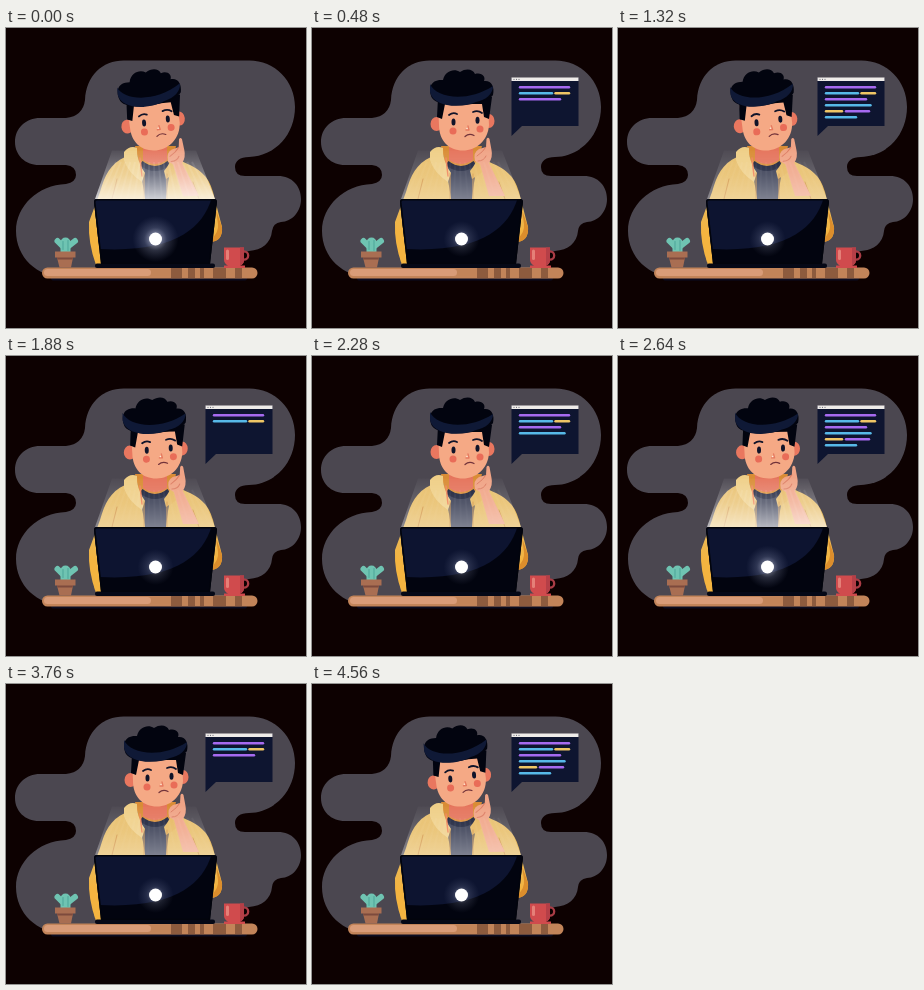
An HTML page that plays this animation: 300 by 300 pixels, repeating every 4.8 s.

```html
<!DOCTYPE html>
<html lang="en">
<head>
<meta charset="utf-8">
<title>Thinking at the laptop</title>
<style>
  html, body { margin: 0; width: 100%; height: 100%; overflow: hidden; background: #0d0101; }
  svg { display: block; width: 100vw; height: 100vh; }
  .line { fill: none; stroke-linecap: round; stroke-linejoin: round; }
</style>
</head>
<body>
<svg viewBox="0 0 300 300">
  <defs>
    <linearGradient id="beamFill" x1="0" y1="0" x2="0" y2="1">
      <stop offset="0" stop-color="#fff" stop-opacity=".06"/>
      <stop offset=".5" stop-color="#fff" stop-opacity=".4"/>
      <stop offset="1" stop-color="#fff" stop-opacity=".95"/>
    </linearGradient>
    <radialGradient id="glowFill">
      <stop offset=".2" stop-color="#e4e8ff" stop-opacity=".55"/>
      <stop offset=".5" stop-color="#a8b0d0" stop-opacity=".25"/>
      <stop offset="1" stop-color="#8088b0" stop-opacity="0"/>
    </radialGradient>
    <linearGradient id="jacket" x1="0" y1="0" x2="0" y2="1">
      <stop offset="0" stop-color="#e8bf6c"/>
      <stop offset=".4" stop-color="#e6b95c"/>
      <stop offset=".7" stop-color="#f4b440"/>
    </linearGradient>
    <clipPath id="lidClip"><path id="lid" d="M91 171H208Q211 171 211 174L204 236H95L88 174Q88 171 91 171Z"/></clipPath>
  </defs>

  <path fill="#4b4750" d="M118 32.500H243C269 32.500 289 53 289 79C289 106 270 128 243 129C234 129 229 133 229 139
    Q229 148 239 148H272C286 148 295 158 295 171C295 184 286 193.500 275 194Q267 195 266 203C265 215 256 222 243 223
    Q234 224 234 232V249H60C32 250 10 230 10 203C10 178 32 157 60 156Q70 154 70 147Q70 138 60 137H33
    C19 137 9 127 9 114C9 100 20 90 34 90H60Q77 88 79 72C80 48 96 32.500 118 32.500Z"/>

  <!-- desk and objects -->
  <rect x="45" y="247" width="196" height="5.500" rx="2" fill="#0b0d22"/>
  <g transform="translate(0 .5)">
    <rect x="36" y="239" width="215.500" height="11" rx="5.500" fill="#c28459"/>
    <rect x="38" y="240.500" width="107" height="7" rx="3.500" fill="#d99c78"/>
    <path fill="#8d5b3e" d="M165 239.500h11v10h-11zM182 239.500h7v10h-7zM194 239.500h4v10h-4zM207 239.500h13v10h-13zM229 239.500h7v10h-7z"/>
    <g class="line" stroke="#6fc4b2" stroke-width="6">
      <path d="M59.500 224V214" stroke-width="10"/>
      <path d="M51.500 212.500L57 218M69 212.500L62 218"/>
    </g>
    <path class="line" stroke="#4ca598" d="M57 213v8M62 212v10"/>
    <path fill="#a96e52" d="M49 223H69.500V229H67L65 239H53.500L51 229H49Z"/>
    <path fill="#7d4a3d" d="M51 229H67L66.500 231H51.500Z"/>
    <circle cx="238" cy="227" r="4.200" fill="none" stroke="#a93c45" stroke-width="2.300"/>
    <path fill="#d04b4d" d="M218 219H238V231Q238 236 234 237H239V239.500H218V237H222Q218 235 218 231Z"/>
    <path fill="#b53f47" d="M234 219H238V231Q238 236 234 237Z"/>
    <path class="line" stroke="#e58078" stroke-width="3" d="M221.500 222.500V230"/>
  </g>

  <!-- torso -->
  <path fill="url(#jacket)" d="M119 129C104 136 99 147 94 164L83 194Q82 215 90 237H204V214Q217 213 216 199
    L207 164C202 147 194 141 175 133Z"/>
  <path fill="#dc8e2c" d="M210 182L212 196Q213 205 205 211V214Q217 213 216 199Z"/>
  <path fill="#343950" d="M133 131L139 171H160L165 131Z"/>
  <path fill="#d98c35" d="M129 118H170L166 136Q149 148 133 136Z"/>
  <path fill="#e5745c" d="M137 114H161V132Q149 140 137 132Z"/>
  <path fill="none" stroke="#181e38" stroke-width="5" d="M135 135Q149 146 163 135"/>
  <path fill="#efcf87" d="M118 124Q124 117 131 120Q130 132 139 145L136 154Q122 145 118 132Z"/>
  <path fill="#e6b75e" d="M166 128Q175 126 178 136Q171 145 160 151L158 143Q164 136 166 128Z"/>
  <path class="line" stroke="#d1913f" d="M138 145V171M161 146V171M111 151L106 171M187 154L193 171"/>
  <path class="line" stroke="#ef8356" stroke-width="1.500" d="M134 130L136 148"/>

  <g id="head">
    <ellipse cx="124.500" cy="96" rx="6" ry="7" fill="#e9775f"/>
    <ellipse cx="177" cy="93" rx="5.500" ry="7" fill="#e9775f"/>
    <path fill="#f5a985" d="M126 75H176L177 97C176 113 164 122.500 151 122.500C137 122.500 127 113 127 97Z"/>
    <g fill="#e96c58">
      <circle cx="141" cy="103" r="3.500"/><circle cx="168" cy="101" r="3.500"/>
    </g>
    <g fill="#10142a">
      <ellipse cx="141.500" cy="94" rx="2" ry="3.500"/>
      <ellipse cx="165.500" cy="92.300" rx="2" ry="3.500"/>
    </g>
    <g class="line">
      <path stroke="#10142a" stroke-width="1.800" d="M137 87Q141 84 145 86M161 84Q166 82 170 85"/>
      <path stroke="#e57a60" stroke-width="1.300" d="M156 98L157 102H154"/>
      <path stroke="#ffe9dc" stroke-width="1.500" d="M155 100.500h.01"/>
      <path stroke="#72333a" stroke-width="1.200" d="M153 108.500Q157 105 162 107.500"/>
    </g>
    <path fill="#02040f" d="M126 70L125 89L130 91L133 76H170L172 89L177 91L180 69Z"/>
    <path fill="#02040f" d="M120 70C116 61 118 51 131 52C133 43 142 40 148 44C154 40 161 41 163 46
      C170 44 174 49 172 53C179 52 183 58 181 67C173 78 128 82 120 70Z"/>
    <path fill="#0f1936" d="M118 56C124 70 155 75 181 58C181 66 174 72 164 74C148 81 121 79 118 64Z"/>
  </g>

  <g id="hand">
    <path fill="#f0a486" d="M163 133Q161 124 167 121L174 119L174.500 111Q176 108.500 177.500 111L179.500 122Q181 129 177 135L193 168H177L168 136Z"/>
    <path class="line" stroke="#dc7c62" d="M165 128Q171 124 174 119M166 133Q172 133 174 128"/>
  </g>

  <g id="beam">
    <path fill="url(#beamFill)" d="M106 122.500H190L209 171H89Z"/>
    <path id="rays" fill="none" stroke="#fff" stroke-opacity=".13" stroke-width="2"/>
  </g>

  <!-- laptop -->
  <rect x="89" y="235.500" width="120" height="4.500" rx="2" fill="#050816"/>
  <g clip-path="url(#lidClip)">
    <path fill="#02040f" d="M80 165H220V240H80Z"/>
    <path fill="#0d1430" d="M80 165H207C200 197 173 225 94 221Z"/>
    <use href="#lid" fill="none" stroke="#02040c" stroke-width="3"/>
  </g>
  <circle id="glow" cx="149.500" cy="211" fill="url(#glowFill)"/>
  <circle cx="149.500" cy="211" r="6.500" fill="#fff"/>

  <g id="bubble">
    <path fill="#0e1530" d="M199.500 50H266.500V98H210L199.500 108Z"/>
    <path fill="#efece9" d="M199.500 49.500H266.500V53H199.500Z"/>
    <path class="line" stroke="#50505e" stroke-width="1.100" d="M202 51.300h.01M204.500 51.300h.01M207 51.300h.01"/>
    <g id="code" class="line" stroke-width="2.400"></g>
  </g>
</svg>
<script>
  const $ = id => document.getElementById(id);
  const purple = '#a66af0', blue = '#57b9e8', yellow = '#efc665';
  const rows = [
    [[208, 257, purple]],
    [[208, 240, blue], [243.5, 257, yellow]],
    [[208, 248, purple]],
    [[208, 252.5, blue]],
    [[208, 224, yellow], [228, 251, purple]],
    [[208, 238, blue]]
  ];
  $('code').innerHTML = rows.map((row, i) => '<g>' + row.map(([from, to, color]) =>
    `<path stroke="${color}" d="M${from} ${59.2 + i * 6}H${to}"/>`).join('') + '</g>').join('');
  const codeRows = [...$('code').children];

  $('rays').setAttribute('d', Array.from({ length: 17 }, (_, i) =>
    `M${110 + i * 4.75} 134L${93 + i * 7} 171`).join(''));

  const ease = (t, from, to) => {
    const p = Math.min(1, Math.max(0, (t - from) / (to - from)));
    return p * p * (3 - 2 * p);
  };
  const pulse = (t, at) => Math.exp(-(((t - at) / 120) ** 2));
  const show = (node, on) => node.setAttribute('visibility', on ? 'inherit' : 'hidden');

  const LOOP = 4800, LAST = 4560, CYCLE = 1600;

  function draw(now) {
    const t = Math.min(now % LOOP, LAST) % CYCLE;
    const lean = 1 - ease(t, 0, 400) + ease(t, 920, 1440);
    const light = Math.min(1, pulse(t, 0) + 0.7 * pulse(t, 1030));

    $('head').setAttribute('transform', `rotate(${-5.5 * lean} 150 130)`);
    $('hand').setAttribute('transform', `rotate(${-1.5 * lean} 182 168)`);
    $('beam').setAttribute('opacity', 0.38 + 0.42 * light);
    $('glow').setAttribute('r', 18 + 5 * light);
    $('glow').setAttribute('opacity', 0.6 + 0.4 * light);

    show($('bubble'), t >= 40);
    codeRows.forEach((row, i) => show(row, t >= 90 + i * 170));
  }

  const start = performance.now();
  function tick() {
    draw(performance.now() - start);
    requestAnimationFrame(tick);
  }
  tick();
</script>
</body>
</html>
```
